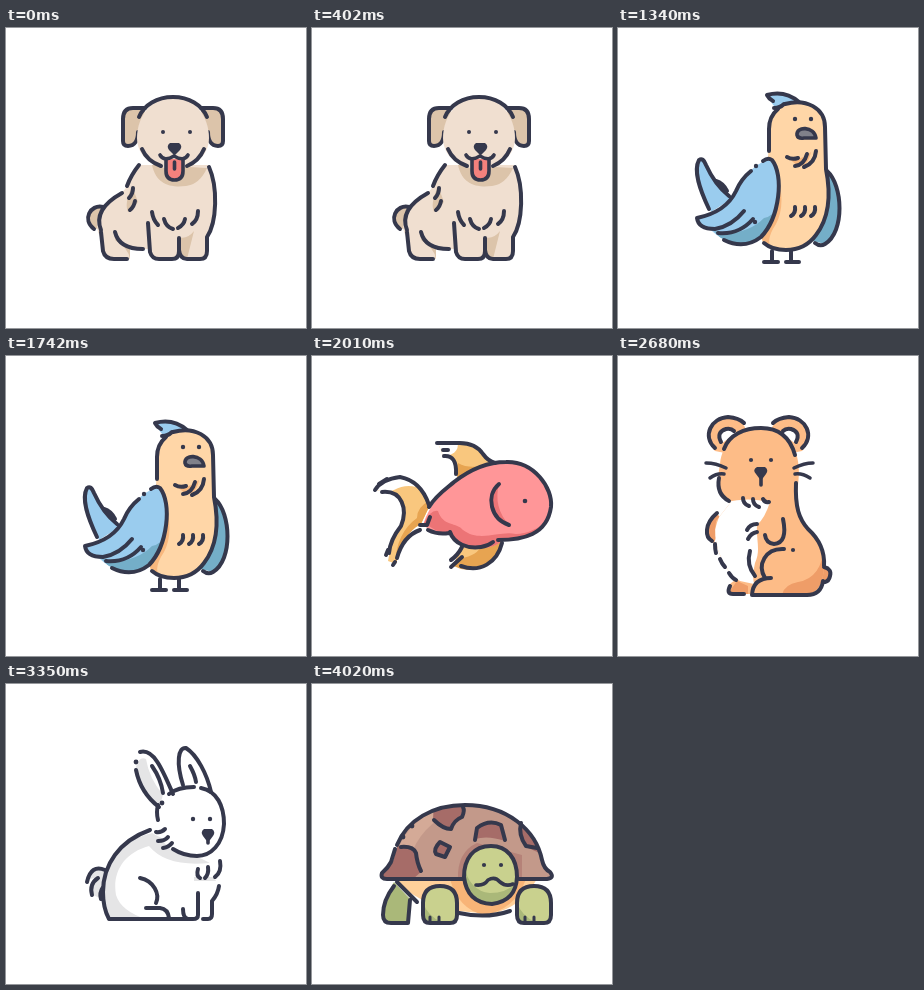
Write an HTML page with a canvas that moves like this. It is 300 px wide and 300 px high and loops after 4690 ms.

```html
<!DOCTYPE html>
<html lang="en">
<head>
<meta charset="utf-8">
<title>Pets</title>
<style>
html, body { margin: 0; width: 100%; height: 100%; overflow: hidden; background: #fff; }
canvas { display: block; width: 300px; height: 300px; }
</style>
</head>
<body>
<canvas id="stage" width="300" height="300"></canvas>
<script>
const ctx = document.getElementById('stage').getContext('2d');
const INK = '#35384c', HOLD = 670;

function fill(color, d) {
  ctx.fillStyle = color;
  ctx.fill(new Path2D(d));
}
function line(d, width = 4) {
  ctx.lineWidth = width;
  ctx.strokeStyle = INK;
  ctx.stroke(new Path2D(d));
}
function dots(radius, ...points) {
  ctx.fillStyle = INK;
  for (const [x, y] of points) {
    ctx.beginPath();
    ctx.arc(x, y, radius, 0, Math.PI * 2);
    ctx.fill();
  }
}
// Draws a part and its reflection about the vertical line x = axis.
function mirrored(axis, draw) {
  draw();
  ctx.save();
  ctx.translate(2 * axis, 0);
  ctx.scale(-1, 1);
  draw();
  ctx.restore();
}
// Fills a shape only where it overlaps another one.
function shade(color, within, d) {
  ctx.save();
  ctx.clip(new Path2D(within));
  fill(color, d);
  ctx.restore();
}

function dog() {
  const coat = '#f0dfd0', tan = '#dcc4aa';
  fill(tan, 'M99 178C84 178 78 191 88 201L99 200Z');
  const body = 'M134 137C123 150 125 158 111 169C93 181 86 195 95 210L97 223Q99 231 108 231H124V221H142L144 224Q146 231 153 231H166Q173 231 173 223Q174 231 181 231H194Q200 231 201 223V209C212 193 211 156 202 137Z';
  fill(coat, body);
  shade(tan, body, 'M146 137C150 156 164 160 180 158Q194 156 201 140Z');
  shade(tan, body, 'M126 158Q118 176 122 184L132 174ZM109 203Q115 218 132 220V231H124Q123 221 109 212ZM172 209Q181 212 188 203L181 231H173Z');
  mirrored(167, () => {
    fill(tan, 'M140 80H127Q117 80 117 91V117Q133 121 133 104Z');
    line('M139 80H127Q117 80 117 91V113Q117 118 122 118C129 118 132 112 132 104');
  });
  fill(coat, 'M167 69C147 69 131 87 131 110C131 128 147 141 167 141S203 128 203 110C203 87 187 69 167 69Z');
  line('M133 89C138 77 151 69 167 69S196 77 201 89M136 121Q141 133 155 138M198 121Q193 133 181 138');
  fill('#f4817d', 'M160 131H177V143Q177 152 168.500 152T160 143Z');
  line('M160 132V143Q160 152 168.500 152T177 143V132M168.500 134V141', 3.6);
  line('M154 127Q158 134 168 128Q178 134 182 127', 3.6);
  fill(INK, 'M164 115H173Q177 118 174 122L169 127Q168 128 167 126L163 122Q160 118 164 115Z');
  dots(2, [157, 104], [184, 104]);
  line('M133 137Q125 147 121 158M127 160Q127 166 123 170M129 173Q128 179 124 182M116 165C98 175 89 187 95 202M97 179C84 176 76 192 88 201M95 204L97 223Q99 231 108 231H121M109 204Q113 221 137 221M142 195L144 224Q146 231 153 231H166Q173 231 173 223V210M173 222Q174 231 181 231H194Q201 231 201 223V209C211 194 212 159 203 139');
  line('M146 184Q147 192 152 197M158 191Q160 199 167 201M179 191Q178 197 172 200M192 183Q192 192 186 196');
}

function cat() {
  const fur = '#fdb77f', deep = '#f28c56';
  fill(fur, 'M196 106C192 95 209 90 215 103C224 128 221 151 206 165L196 157C211 139 207 126 196 106Z');
  fill(deep, 'M196 106C192 94 209 90 215 103L216 107Q206 106 201 115ZM196 157L207 164L212 156Q203 156 201 151Z');
  const body = 'M101 164Q99 181 84 207C77 219 80 229 92 229H184Q196 229 196 218H205Q214 217 211 207L206 204C219 180 208 153 172 153Z';
  fill(fur, body);
  shade(deep, body, 'M111 166Q126 180 149 176Q165 173 171 154L160 152ZM104 206H128Q140 207 139 219Q141 207 153 206H178Q190 206 196 218L206 207Q198 201 184 201H147Q139 208 130 202Z');
  fill(fur, 'M94 110C91 92 93 72 100 72C109 72 117 99 117 99L153 98Q163 72 174 73C184 75 181 101 175 121Z');
  fill(deep, 'M95 84Q103 85 109 101L97 111Q93 96 95 84ZM180 84Q169 84 162 100L174 112Q180 98 180 84Z');
  fill(fur, 'M132 95C105 95 92 114 92 139C92 160 109 174 132 174S173 160 173 139C173 114 158 95 132 95Z');
  fill('#fff', 'M131 140C117 138 108 148 113 160Q120 171 132 173Q146 171 151 159C155 148 146 138 131 140Z');
  line('M96 109C91 91 93 72 100 72C107 72 113 84 117 95M153 95Q163 73 173 73C183 74 180 99 175 114M104 108C118 92 146 91 160 109M95 148Q98 160 109 166M169 148Q166 159 158 165');
  line('M82 128Q89 128 95 132M80 145Q87 142 92 142M188 128Q181 128 175 132M187 145Q181 142 174 142', 3.5);
  fill(INK, 'M126 133H137Q142 135 138 140L134 144Q131.500 147 129 144L125 140Q121 135 126 133Z');
  line('M131.500 142V149Q131 153 126 154M131.500 149Q132 153 137 154', 3.4);
  dots(2, [117, 125], [145, 125]);
  line('M196 106C192 95 209 90 215 103C223 126 222 148 208 163M201 112C208 127 211 139 198 156M172 154C199 152 214 171 210 191L206 204Q213 209 211 213Q209 218 202 217M101 171Q98 184 84 207C77 219 80 229 92 229H130M105 206H126Q140 206 140 219Q139 229 130 229M140 219Q140 206 153 206H178Q196 206 196 219Q196 229 185 229H141');
  line('M120 180Q122 187 128 189M126 187Q131 195 138 192M136 186Q139 193 146 191M148 188Q151 195 158 192M177 181Q184 182 188 188M180 193Q186 193 190 199');
}

function bird() {
  const blue = '#9accee', deep = '#74aec8', cream = '#ffd6a7';
  fill(blue, 'M81 132C76 145 85 164 93 184L115 170L109 165Q104 156 97 153Q91 146 88 136Q84 129 81 132Z');
  fill(deep, 'M208 142C225 158 227 204 207 216L195 213Z');
  fill(blue, 'M182 74Q168 62 150 66Q153 78 162 83Z');
  const body = 'M180 74C162 74 151 86 151 101L150 132L144 213Q150 223 169 222C190 221 205 202 210 174C213 155 208 139 207 99C206 84 196 74 180 74Z';
  fill(cream, body);
  shade('#f8b77d', body, 'M158 142Q164 178 143 211L155 221Q146 214 158 196Q169 175 158 142ZM165 126Q178 137 193 124Q190 139 180 138Z');
  const wing = 'M152 131C136 136 123 150 117 166Q107 184 79 190Q79 197 91 200C103 213 120 220 140 212C160 202 167 155 158 138Z';
  fill(blue, wing);
  shade(deep, wing, 'M96 203C114 208 133 203 146 190Q156 188 159 178L151 206L135 220L105 213Z');
  line('M151 123V101C151 92 154 86 160 81M167 76C188 70 207 80 207 99L208 141C213 166 211 190 198 207Q187 222 168 222Q154 222 146 215');
  line('M181 74Q167 62 149 67Q151 71 155 73M156 80Q162 80 166 76M209 143C225 157 227 204 207 216Q202 219 197 215');
  line('M145 133Q150 129 154 132C166 147 162 189 143 209Q126 222 106 212M133 143Q123 151 118 163Q108 184 79 190C80 198 87 201 97 201Q114 198 126 183M100 205Q121 207 135 191M91 181C82 162 75 143 81 132Q85 129 88 137Q97 157 111 168M98 153Q105 155 109 163');
  line('M169 129Q174 132 180 130M177 138Q186 137 189 126M186 139Q197 135 198 123M177 179Q178 185 173 188M187 179Q188 185 183 188M197 179Q198 185 193 188');
  line('M154 223V234M146 234H160M173 223V234M168 234H181');
  const beak = 'M179 107C178 98 196 98 198 110H186Q180 111 179 107Z';
  fill('#80818a', beak);
  line(beak, 3.6);
  dots(2.2, [177, 91], [193, 91], [138, 138], [137, 194]);
}

function fish() {
  const gold = '#f9c77e', amber = '#e7a451', pink = '#ff9698', rose = '#ec7476';
  const fin = 'M126 87H147Q164 86 171 99Q176 106 184 107L145 121Q145 99 131 100Z';
  fill(gold, fin);
  shade('#fff', fin, 'M122 83H144Q149 93 140 98L130 102Z');
  shade(amber, fin, 'M143 121L146 107Q162 116 184 104L184 115Z');
  const tail = 'M63 134Q74 119 94 121Q112 128 117 151L109 168Q91 177 84 208L76 205Q78 189 88 173C96 151 86 135 69 135Z';
  fill(gold, tail);
  shade('#fff', tail, 'M61 135Q72 117 92 121Q101 123 104 131Q93 128 82 134L70 138Z');
  shade(amber, tail, 'M117 145Q105 151 105 162Q84 177 83 209L114 173Z');
  fill(amber, 'M149 188Q148 201 139 209L149 213C170 217 186 204 190 184Z');
  fill(gold, 'M149 188Q150 198 144 203Q163 201 169 191Z');
  const body = 'M111 169Q116 153 126 142C147 119 167 108 194 106C222 105 241 132 240 150C238 174 215 184 191 184Q179 195 160 191Q144 189 138 178Q123 179 111 169Z';
  fill(pink, body);
  shade(rose, body, 'M112 167Q119 153 126 155C131 171 145 166 151 174C168 187 188 174 204 178Q220 178 238 163L230 187L174 199L136 182Z');
  shade(rose, body, 'M187 128Q171 142 185 160L197 169Q181 151 187 128Z');
  line('M125 87H145Q163 86 171 98Q176 105 183 107M131 94H136M132 100Q145 99 144 118');
  line('M117 151C124 139 135 132 142 126C160 112 179 106 194 106C222 105 241 132 239 151C235 179 211 184 186 184M108 169H114M118 161L115 169M116 174Q126 179 137 177M138 176C142 188 156 193 169 191Q176 190 181 186');
  line('M63 134Q70 123 88 121Q109 125 117 149M67 128L75 123M70 136C90 134 96 153 89 170Q78 184 77 197M76 194L74 199M108 174Q91 180 85 202M83 206L81 209');
  line('M150 191Q146 199 139 204M150 201L139 211M149 210C168 217 185 207 190 187');
  line('M187 128C173 140 179 163 197 169');
  dots(2.3, [213, 145]);
}

function hamster() {
  const fur = '#fdbc87', deep = '#ef9d68';
  mirrored(140.5, () => {
    fill(fur, 'M97 95C84 82 92 62 110 61Q123 63 128 73L112 98Z');
    fill('#fff', 'M103 88Q97 77 108 73Q114 72 118 77Z');
    line('M97 92C84 80 93 62 110 61Q121 62 126 67M103 86Q98 76 108 73Q113 72 116 75');
  });
  fill(deep, 'M203 211Q214 212 213 219Q211 226 200 228Z');
  fill(deep, 'M99 157C84 168 86 184 96 187L104 165Z');
  const body = 'M143 72C121 72 104 86 102 108Q96 139 113 146L98 165Q93 196 118 224Q107 229 111 238H190Q205 236 206 210Q203 187 193 177Q176 160 180 129C185 96 171 72 143 72Z';
  fill(fur, body);
  shade('#fff', body, 'M108 146Q130 141 152 146Q147 162 139 169C138 184 143 194 137 207Q134 219 136 228L122 225Q98 211 94 187Q98 164 108 146Z');
  shade(deep, body, 'M206 190Q204 222 180 226Q165 229 164 240H206ZM109 239L119 225L130 230V239Z');
  line('M106 93C111 79 126 72 143 72S172 81 177 99M101 122Q98 138 111 145M178 127C177 151 181 163 190 173C201 183 207 195 206 210M206 211Q214 213 212 220Q211 225 207 226M205 225Q203 239 189 239H134Q135 222 153 222');
  line('M88 107Q98 107 108 112M92 122Q99 117 106 118M195 107Q186 107 176 112M192 122Q184 117 177 118', 3.5);
  fill(INK, 'M139 111H147Q151 114 148 118L145 122Q143 125 141 122L138 118Q134 114 139 111Z');
  line('M143 121V129', 3.6);
  dots(2.1, [133, 104], [153, 104], [175, 194]);
  line('M125 142Q125 148 131 150M135 143Q135 149 141 151M145 143Q147 147 151 146M99 157C86 168 87 181 94 185M165 163Q170 187 156 188Q148 187 147 179M139 168Q132 168 129 174M139 176Q133 177 130 183');
  line('M97 188Q97 193 98 197M102 203Q104 208 107 211M111 217Q114 222 118 224M112 230Q108 238 115 238H126M166 193C147 192 139 209 147 222M132 195Q128 209 137 220');
}

function rabbit() {
  const grey = '#e5e5e6';
  fill(grey, 'M130 83Q133 72 140 75Q143 94 157 111L153 124Q133 108 130 83Z');
  const body = 'M146 149C114 156 97 181 97 207Q96 222 103 235H164L179 235H206V216Q215 206 214 184L190 172L167 160Z';
  shade(grey, body, 'M146 149C114 156 97 181 97 207Q96 222 103 235H140Q115 227 110 211C106 188 118 169 143 162Q160 183 203 179L214 170L160 145Z');
  fill(grey, 'M98 185Q82 183 80 196L88 194Q83 202 87 211L96 215ZM188 197H210L208 193H188Z');
  fill('#fff', 'M185 103C164 103 152 119 152 139C152 160 170 173 188 173S218 157 218 139C218 119 205 103 185 103Z');
  line('M130 86C133 101 140 113 153 123M134 68C148 64 157 87 167 110M146 82Q155 95 157 109M177 101C170 79 172 63 180 64C191 71 201 90 205 108M184 82Q189 91 190 98');
  dots(2.4, [130, 78], [156, 119]);
  line('M152 136Q150 128 152 121M163 110Q172 103 188 103M195 104C211 107 218 122 218 140C217 160 205 172 191 172Q178 172 167 165');
  line('M150 148Q155 149 159 145M152 157Q159 157 162 153M157 164Q163 163 166 159M144 146C113 157 97 181 97 208Q97 224 103 235H183M134 194C148 197 154 210 150 219M140 224H154Q162 225 163 234M99 186Q85 180 81 198M92 194Q83 200 86 211M97 203Q93 209 95 215');
  line('M192 209V231Q192 235 187 235H182Q177 234 177 225M197 235H202Q206 235 206 230V217Q212 210 213 202');
  line('M192 185Q190 192 194 194M202 183Q203 190 199 194M214 177Q216 188 209 193');
  fill(INK, 'M198 145H206Q210 148 207 152L204 156Q202 158 200 156L197 152Q194 148 198 145Z');
  line('M202 154V159', 3.6);
  dots(2.2, [187, 135], [204, 135]);
}

function turtle() {
  const shell = '#c3998a', spot = '#a66c68', green = '#c9d18e', olive = '#aab879', sand = '#ffd09a';
  fill(sand, 'M83 195H225Q207 225 181 229Q113 230 83 195Z');
  fill('#f8b477', 'M138 195H214Q203 226 172 231Q146 225 138 195Z');
  fill(olive, 'M82 198Q71 215 71 232Q71 239 79 239H97L99 216Z');
  const dome = 'M71 194Q67 188 76 184Q82 179 83 169C93 137 121 121 153 121C198 121 224 149 229 178Q232 184 238 188Q242 195 234 195H74Q71 195 71 194Z';
  fill(shell, dome);
  shade('#d4aa97', dome, 'M83 176C91 139 123 121 153 121Q113 137 101 166L85 188Z');
  shade(spot, dome, 'M80 162Q98 160 104 169L110 187L101 195H68ZM122 119H151L152 132Q142 138 139 145Q129 144 121 135ZM208 137L232 158V171L214 163Q206 151 208 137ZM128 158L138 163L133 173L124 170Q121 165 128 158ZM163 155L165 142Q177 135 189 141L193 157Q176 151 163 155Z');
  shade('#b58278', dome, 'M146 195Q145 168 165 159L210 171V195Z');
  line('M85 161C95 136 121 121 153 121C195 121 224 146 230 176Q232 185 238 188Q243 194 235 195H207M79 178Q76 184 70 189Q68 195 75 195H153M83 165L79 178');
  line('M89 163Q101 162 104 169Q105 179 109 187M122 136Q131 145 139 145Q142 136 150 133Q153 127 151 123M128 158L138 163L133 173L124 170Q121 165 128 158ZM163 156L165 144Q177 135 189 141L193 156M209 139Q206 151 214 162L225 164');
  dots(2.4, [91, 153], [100, 142]);
  line('M85 198L105 218M147 229Q175 235 198 227M82 202Q71 216 71 231Q71 239 79 239H96L98 216');
  const head = 'M179 162C161 162 152 175 152 193Q155 219 180 220Q204 217 205 193C205 174 195 162 179 162Z';
  fill(green, head);
  shade(olive, head, 'M152 181Q157 207 178 209Q194 209 205 199V222H152Z');
  line(head);
  line('M164 201Q172 202 176 196Q183 192 188 198Q194 203 201 200', 3.6);
  dots(2.1, [172, 181], [189, 181]);
  for (const x of [111, 205]) {
    const leg = `M${x} 219Q${x} 202 ${x + 17} 202T${x + 34} 219V231Q${x + 34} 239 ${x + 27} 239H${x + 7}Q${x} 239 ${x} 231Z`;
    fill(green, leg);
    shade(olive, leg, `M${x} 218Q${x + 4} 232 ${x + 20} 239H${x}Z`);
    line(leg);
  }
  line('M118 233V238M127 233V238M213 233V238M222 233V238', 3);
}

const pets = [dog, cat, bird, fish, hamster, rabbit, turtle];
const start = performance.now();
let shown = -1;

function tick() {
  const index = Math.floor((performance.now() - start) / HOLD) % pets.length;
  if (index !== shown) {
    shown = index;
    ctx.fillStyle = '#fff';
    ctx.fillRect(0, 0, 300, 300);
    ctx.lineCap = ctx.lineJoin = 'round';
    pets[index]();
  }
  requestAnimationFrame(tick);
}
tick();
</script>
</body>
</html>
```
